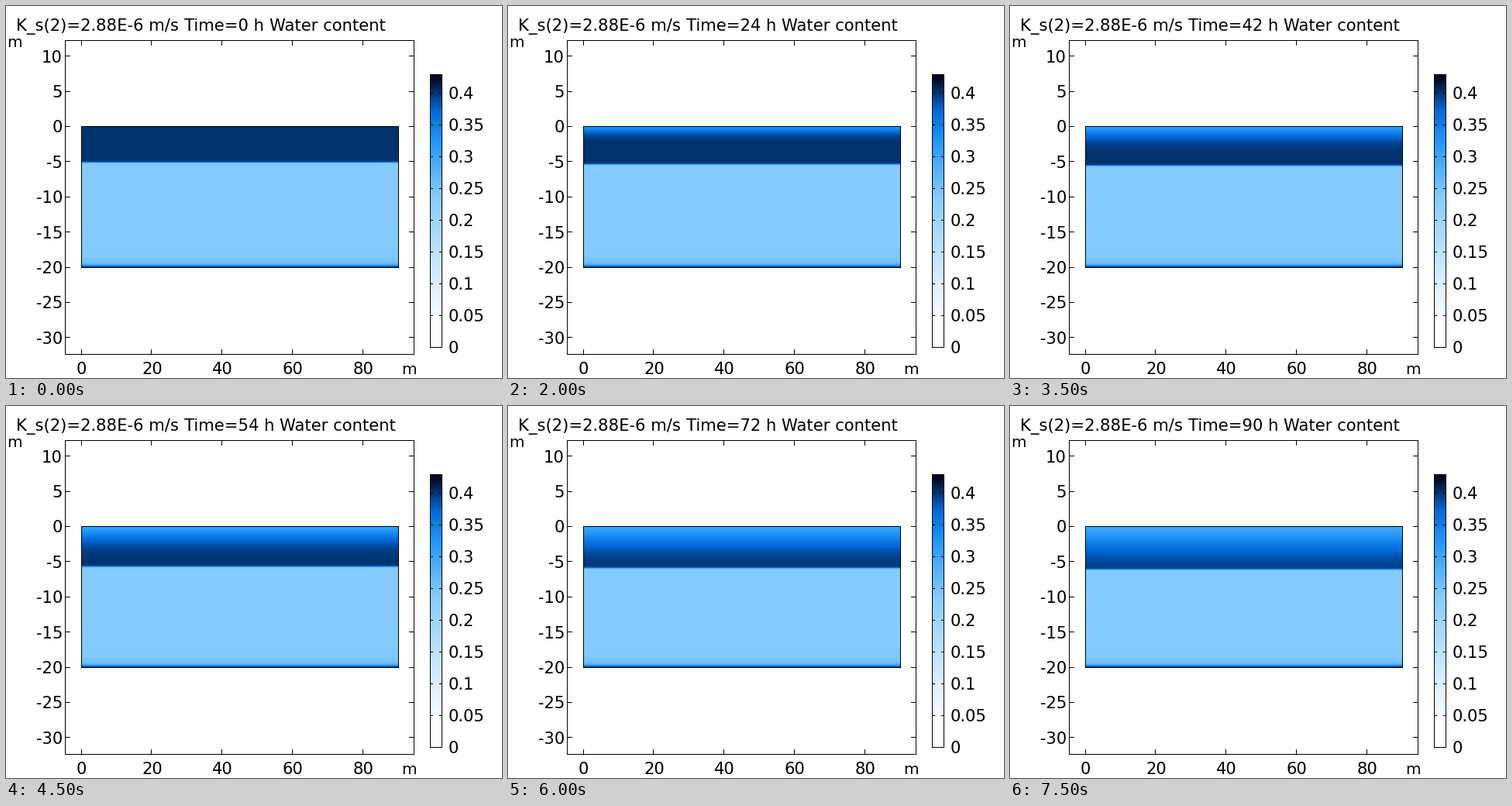
Animation of 640 by 480 pixels, one loop 8000 ms. Source, as a matplotlib script:

```python
import numpy as np
import matplotlib.pyplot as plt
from matplotlib.animation import FuncAnimation
from matplotlib.colors import LinearSegmentedColormap
from matplotlib.patches import Rectangle

W, H, DPI = 640, 480, 80
PX = 72 / DPI
FRAMES, INTERVAL, HOURS_PER_FRAME = 16, 500, 6
V_MAX, SAT, DRY = 0.43, 0.403, 0.237

plt.rcParams["font.family"] = "DejaVu Sans"

cmap = LinearSegmentedColormap.from_list("water", [
    (0, "white"), (0.1, "white"), (0.55, "#86ccff"),
    (0.76, "#2096fa"), (0.87, "#0068d8"), (1, "#00000a")], N=1024)

fig = plt.figure(figsize=(W / DPI, H / DPI), dpi=DPI, facecolor="white")
ax = fig.add_axes([0, 0, 1, 1])


def line(x0, y0, x1, y1):
    """One-pixel line; whole coordinates snap to pixel centres."""
    ax.plot(np.floor([x0, x1]), np.floor([y0, y1]), color="black", lw=PX,
            solid_capstyle="butt", antialiased=False, zorder=4)


def box(x0, y0, x1, y1):
    ax.add_patch(Rectangle((x0, y0), x1 - x0, y1 - y0, fill=False,
                           ec="black", lw=PX, antialiased=False, zorder=4))


def label(x, y, s, ha="left", size=21.1):
    return ax.text(x, y, s, ha=ha, va="baseline", size=size * PX)


def field(values, x0, y0, x1, y1):
    """Column of values filling the box, with its outline."""
    box(x0, y0, x1, y1)
    return ax.imshow(values[:, None], cmap=cmap, vmin=0, vmax=V_MAX,
                     extent=(x0, x1 + 1, y1 + 1, y0), aspect="auto",
                     interpolation="nearest")


def water_content(depth, hours):
    """Draining top layer, sinking front and capillary fringe."""
    loss = 0.065 * (hours / 12) ** 0.25
    reach = 0.15 + 0.031 * hours
    top = SAT - loss * np.exp(-(depth / reach) ** 1.5)
    front = 5.1 + 0.011 * hours
    wet = (1 - np.tanh((depth - front) / 0.11)) / 2
    fringe = 1 / (1 + ((20 - depth) / 0.3) ** 2.2)
    return DRY + (top - DRY) * wet + (SAT + 0.01 - DRY) * fringe


# Axes box
LEFT, TOP, RIGHT, BOTTOM, TICK = 76, 44, 526, 449, 6
box(LEFT, TOP, RIGHT, BOTTOM)
for v in range(-30, 11, 5):
    y = 155.4 - 9.08 * v
    line(LEFT, y, LEFT + TICK, y)
    line(RIGHT - TICK, y, RIGHT, y)
    label(73, y + 8, str(v), "right")
for v in range(0, 81, 20):
    x = 97 + 4.544 * v
    line(x, TOP, x, TOP + TICK)
    line(x, BOTTOM - TICK, x, BOTTOM)
    label(x + 0.5, 475, str(v), "center")
label(1, 53, "m", size=20)
label(510, 475, "m", size=20)

# Colour bar
field(np.linspace(V_MAX, 0, 353), 547, 88, 562, 440)
for k in range(9):
    y = 440.3 - 40.94 * k
    line(547, y, 550, y)
    line(559, y, 562, y)
    label(571, y + 7.5, f"{0.05 * k:.2g}")

# Soil section
depth = np.linspace(0, 20, 183)
soil = field(water_content(depth, 0), 97, 155, 506, 337)

label(13, 32, "K_s(2)=2.88E-6 m/s")
clock = label(230, 32, "")
caption = label(340, 32, "Water content")

ax.set_axis_off()
ax.set_xlim(0, W)
ax.set_ylim(H, 0)


def update(i):
    hours = HOURS_PER_FRAME * i
    soil.set_data(water_content(depth, hours)[:, None])
    clock.set_text(f"Time={hours} h")
    caption.set_x(327 + 13 * len(str(hours)))
    return soil, clock, caption


anim = FuncAnimation(fig, update, frames=FRAMES, interval=INTERVAL,
                     repeat=True, repeat_delay=0, blit=False)
plt.show()
```
